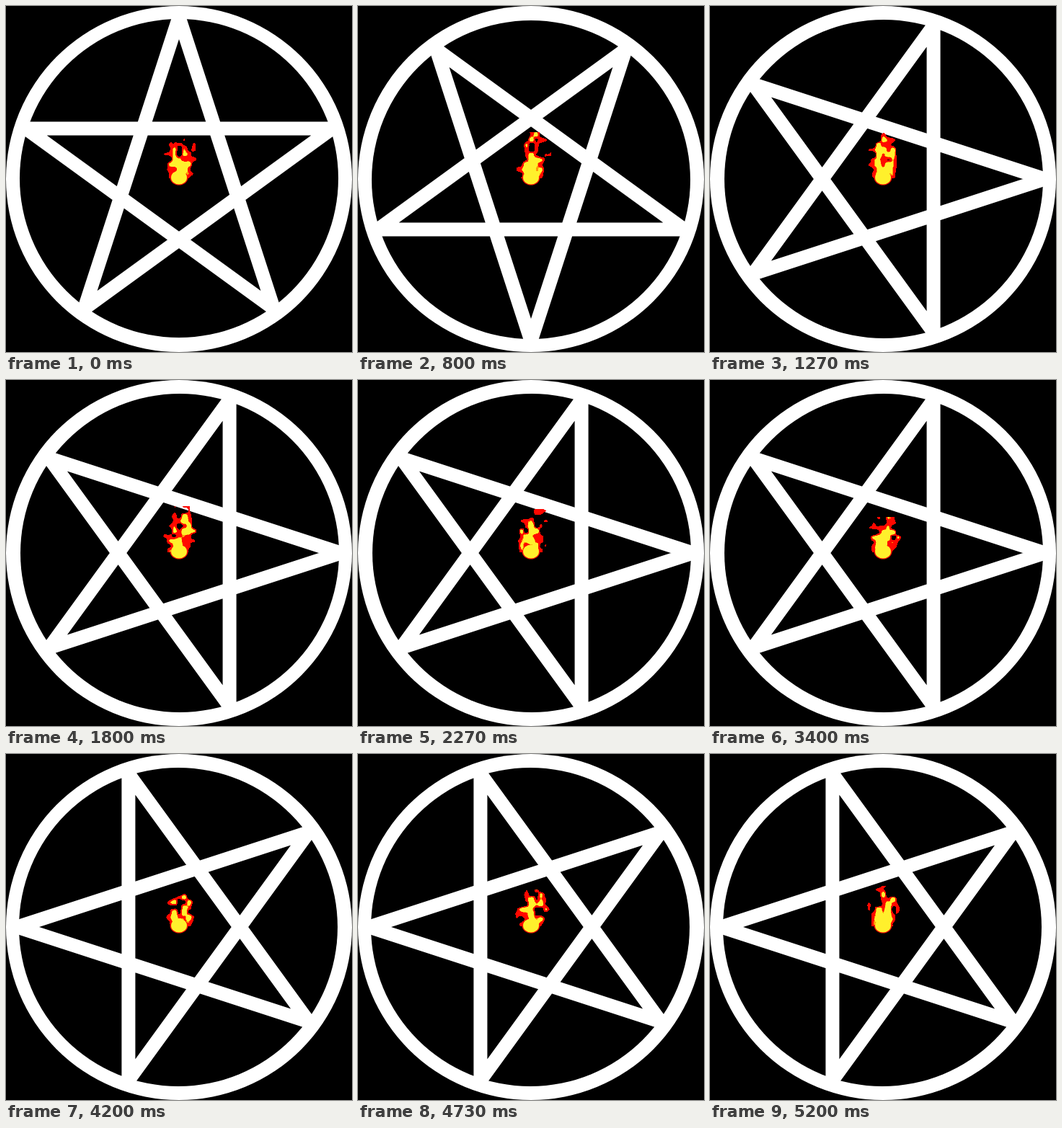
Recreate the animation shown at these times as an HTML page with a canvas. Size 480 by 480 pixels, loop 5.27 s.

```html
<!DOCTYPE html>
<html lang="en">
<head>
<meta charset="utf-8">
<title>Turning star and flame</title>
<style>
  html, body { margin: 0; width: 100%; height: 100%; overflow: hidden; background: #000; }
  canvas { display: block; width: 100vw; height: 100vh; }
</style>
</head>
<body>
<canvas id="stage" width="480" height="480"></canvas>
<script>
const ctx = document.getElementById('stage').getContext('2d');
const LOOP = 5270, STEPS = 79, TAU = Math.PI * 2;
const RED = '#ff0800', ORANGE = '#ff9a08', YELLOW = '#fff02c';

function hash(x, y) {
  const s = Math.sin(x * 127.1 + y * 311.7) * 43758.5453;
  return s - Math.floor(s);
}

const ease = v => v * v * (3 - 2 * v);
const mix = (a, b, v) => a + (b - a) * v;

function noise(x, y) {
  const i = Math.floor(x), j = Math.floor(y);
  const u = ease(x - i), v = ease(y - j);
  return mix(
    mix(hash(i, j), hash(i + 1, j), u),
    mix(hash(i, j + 1), hash(i + 1, j + 1), u), v);
}

function ellipse(x, y, rx, ry, color) {
  ctx.fillStyle = color;
  ctx.beginPath();
  ctx.ellipse(x, y, rx, ry, 0, 0, TAU);
  ctx.fill();
}

// Rising noise, cooled by height and by distance from a slightly leaning axis.
function flame(step) {
  const height = 58 + 9 * Math.sin(TAU * step / STEPS);
  ellipse(0, -2, 12.5, 10.5, RED);
  for (let h = 2; h < height; h++) {
    const u = h / height;
    const axis = 6 * u - 1;
    const width = 13 + 4 * Math.sin(Math.PI * u);
    for (let x = -24; x <= 30; x++) {
      const e = (x - axis) / width;
      const n = noise(x / 7 + 50, (step * 4 - h) / 7) - 0.5;
      const heat = 1 - 0.75 * u * u - 0.5 * e * e + n * 1.6 * Math.min(1, 0.3 + u * 1.4);
      if (heat < 0.42) continue;
      ctx.fillStyle = heat > 0.85 ? YELLOW : heat > 0.8 ? ORANGE : RED;
      ctx.fillRect(x, -h, 1, 1);
    }
  }
  ellipse(0, -2, 11, 9.5, YELLOW);
}

function star(turns) {
  const R = 223.6;
  ctx.save();
  ctx.rotate(turns * Math.PI / 2);
  ellipse(0, 0, 240, 240, '#fff');
  ctx.translate(0, -1);
  ellipse(0, 0, 221, 221, '#000');
  ctx.strokeStyle = '#fff';
  ctx.lineJoin = 'bevel';
  ctx.lineWidth = 19;
  ctx.beginPath();
  for (let i = 0; i < 5; i++) {
    const a = i * TAU * 2 / 5;
    ctx.lineTo(R * Math.sin(a), -R * Math.cos(a));
  }
  ctx.closePath();
  ctx.stroke();
  ctx.restore();
}

const start = performance.now();

function draw() {
  const t = (performance.now() - start) % LOOP;
  const step = Math.min(STEPS - 1, Math.floor(t / LOOP * STEPS + 0.1));
  ctx.setTransform(1, 0, 0, 1, 0, 0);
  ctx.fillStyle = '#000';
  ctx.fillRect(0, 0, 480, 480);
  ctx.translate(240, 240);
  star(Math.floor(step / 2) % 4);
  flame(step);
  requestAnimationFrame(draw);
}
draw();
</script>
</body>
</html>
```
